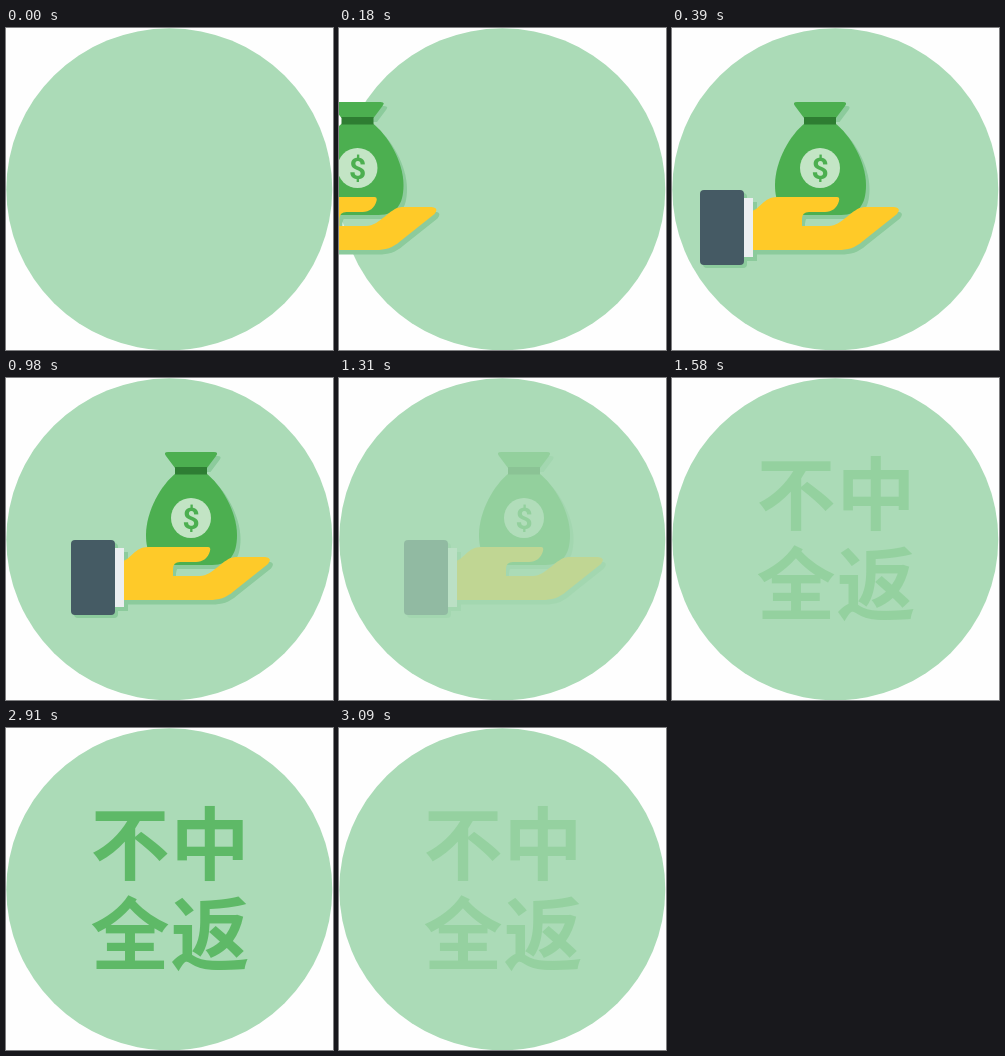
Write an HTML page that moves like this. It is 327 by 322 pixels and loops after 3.18 s.

```html
<!DOCTYPE html>
<html lang="zh-CN">
<head>
<meta charset="utf-8">
<title>Refund badge</title>
<style>
  html, body { margin: 0; width: 100%; height: 100%; overflow: hidden; background: #fefefe; }
  svg { display: block; width: 100%; height: 100%; }
  #words { font: 700 79px "Noto Sans CJK SC", "Noto Sans CJK", sans-serif; fill: #52b45a; text-anchor: middle; }
  #dollar { font: 700 30px Roboto, Arial, sans-serif; fill: #4caf50; text-anchor: middle; }
</style>
</head>
<body>
<svg viewBox="0 0 327 322">
  <defs>
    <g id="bag">
      <path d="M125 74H171Q176 74 173 78L164 90H132L123 78Q120 74 125 74Z"/>
      <path d="M133 95H163C178 107 194 133 194 157C194 176 187 187 169 187H127C110 187 103 176 103 157C103 133 118 107 133 95Z"/>
    </g>
    <path id="palm" d="M80 183C88 181 92 169 105 169H165Q168 169 167 173C165 180 160 184 153 184H137Q130 184 130 191V198H157C170 198 180 180 192 179H222Q230 180 225 186L191 213C183 220 176 222 166 222H80Z"/>
    <rect id="cuff" x="71" y="170" width="10" height="59"/>
    <rect id="sleeve" x="28" y="162" width="44" height="75" rx="4"/>
  </defs>
  <ellipse cx="163.3" cy="161.3" rx="163" ry="161" fill="#abdbb7"/>
  <g id="gift">
    <g fill="#8ccb9c">
      <use href="#bag" x="3.5" y="4"/>
      <use href="#palm" x="3" y="4.5"/>
      <use href="#cuff" x="4" y="4"/>
      <use href="#sleeve" x="3" y="3"/>
    </g>
    <use href="#bag" fill="#4caf50"/>
    <rect x="132" y="89" width="32" height="7.5" fill="#2e7d32"/>
    <circle cx="148" cy="140" r="20" fill="#c3e5c5"/>
    <text id="dollar" x="148" y="151">$</text>
    <use href="#palm" fill="#ffca28"/>
    <use href="#cuff" fill="#eceff1"/>
    <use href="#sleeve" fill="#455a64"/>
  </g>
  <g id="words">
    <text x="124" y="146">不</text>
    <text x="204" y="146">中</text>
    <text x="124" y="235.5">全</text>
    <text x="204" y="235.5">返</text>
  </g>
</svg>
<script>
const LOOP = 3180, HOME = 37;
const gift = document.getElementById("gift");
const words = document.getElementById("words");
const clamp = v => Math.max(0, Math.min(1, v));

// The hand glides in by equal steps of 30 ms.
function slide(t) {
  const left = Math.max(0, 15 - Math.floor(t / 30));
  return HOME - 18.5 * left;
}

function giftAlpha(t) {
  const p = clamp((t - 950) / 540);
  return (1 + Math.cos(Math.PI * p)) / 2;
}

function wordsAlpha(t) {
  if (t < 1580) return 0;
  if (t < 2910) return Math.min(1, (Math.floor((t - 1580) / 80) + 1) / 4);
  return 0.86 - 0.205 * Math.floor((t - 2910) / 60 > 3 ? 3 : (t - 2910) / 60);
}

function draw(t) {
  const alpha = giftAlpha(t);
  gift.setAttribute("transform", `translate(${slide(t)} 0)`);
  gift.setAttribute("opacity", alpha);
  gift.setAttribute("visibility", t < 30 || alpha === 0 ? "hidden" : "visible");
  words.setAttribute("opacity", wordsAlpha(t));
}

const start = performance.now();
function tick() {
  draw((performance.now() - start) % LOOP);
  requestAnimationFrame(tick);
}
tick();
</script>
</body>
</html>
```
